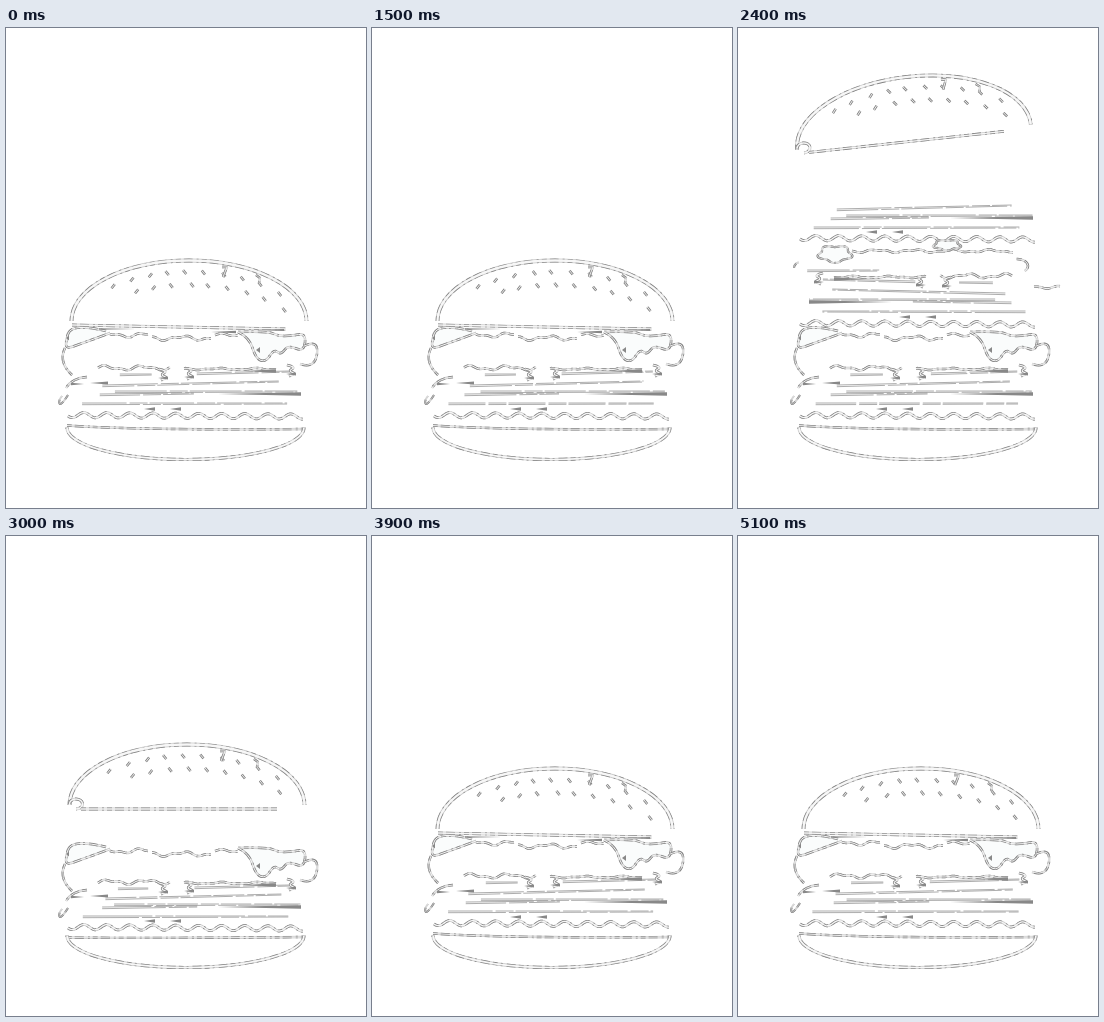
An HTML page with a canvas for the animation above (5.4 s loop, 360x480 px).

```html
<!DOCTYPE html>
<html lang="en">
<head>
<meta charset="utf-8">
<title>Bouncing burger sketch</title>
<style>
html, body { margin: 0; width: 100%; height: 100%; overflow: hidden; background: #fff; }
canvas { display: block; }
</style>
</head>
<body>
<canvas id="stage" width="360" height="480"></canvas>
<script>
const ctx = document.getElementById('stage').getContext('2d');
const LOOP = 5400, BEAT = 300, MID = 183;

// Beats that only prolong the one before
const held = new Set([1, 6, 9, 14]);

// Where the top bun goes; it rests on every other beat
const moves = {
  7: { x: 0, y: -10, turn: 0, squash: 0.2 },
  8: { x: -7, y: -184, turn: -0.108, squash: 0, tall: true },
  10: { x: -2, y: -24, turn: 0, squash: 1 }
};
const rest = { x: 0, y: 0, turn: 0, squash: 0 };

let state = 1;
const seedWith = n => { state = (n + 1) * 7919; };
const rnd = () => (state = state * 16807 % 2147483647) / 2147483647;

function at(x, y, part, flip = 1, turn = 0) {
  ctx.save();
  ctx.translate(x, y);
  ctx.rotate(turn);
  ctx.scale(flip, 1);
  part();
  ctx.restore();
}

function stroke(path, color, width, dash = []) {
  ctx.strokeStyle = color;
  ctx.lineWidth = width;
  ctx.setLineDash(dash);
  ctx.stroke(path);
}

// A white stroke with thin, broken grey edges
function ink(path, w = 3) {
  stroke(path, '#c8c8c8', w);
  stroke(path, '#858585', w, [5, 3, 9, 4, 2, 3]);
  stroke(path, '#f7f7f7', w - 1.5);
}

function fill(path, color = '#fafcfc') {
  ctx.fillStyle = color;
  ctx.fill(path);
}

// Smooth path through the midpoints of a few points
function curve(...p) {
  const path = new Path2D();
  path.moveTo(...p[0]);
  for (let i = 1; i < p.length - 1; i++) {
    const [x, y] = p[i], [u, v] = p[i + 1];
    const end = i === p.length - 2 ? [u, v] : [(x + u) / 2, (y + v) / 2];
    path.quadraticCurveTo(x, y, ...end);
  }
  return path;
}

function plot(x1, x2, f) {
  const path = new Path2D();
  for (let x = x1; x <= x2; x++) path.lineTo(x, f(x));
  return path;
}

function arc(x, y, rx, ry, from, to) {
  const path = new Path2D();
  path.ellipse(x, y, rx, ry, 0, from, to);
  return path;
}

const wave = (x1, x2, y) =>
  ink(plot(x1, x2, x => y + (x - x1) / 150 + 2.6 * Math.sin((x - x1) * Math.PI / 11.5 + 0.4)), 2.8);

function squiggle(x1, x2, y, amp = 2.4) {
  const p = rnd();
  ink(plot(x1, x2, x => y + amp * (0.7 * Math.sin(x / 6 + p) + 0.4 * Math.sin(x / 2.7))), 2.5);
}

// Two hairlines that drift apart
function bar(x1, x2, y, tilt = 0) {
  x1 += rnd() * 5;
  x2 -= rnd() * 5;
  for (const gap of [0, 1.7]) {
    const path = new Path2D(`M${x1},${y + gap}L${x2},${y + tilt + gap * 0.6}`);
    stroke(path, '#999', 0.8, [30 + rnd() * 40, 3, 18, 2]);
  }
}

// Shadow, thick at its second end
function wedge(x1, x2, y, h) {
  fill(new Path2D(`M${x1},${y}L${x2},${y - h / 2}v${h}Z`), '#888');
}

function knob(x, y) {
  ink(curve([x - 5, y - 6], [x + 4, y - 4], [x - 4, y], [x + 5, y + 3], [x - 3, y + 5]), 2.6);
  wedge(x - 6, x + 4, y + 3, 3);
}

function blob(x, y, rx, ry) {
  const path = new Path2D();
  for (let a = 0; a < 6.3; a += 0.1) {
    const r = 1 + 0.13 * Math.sin(a * 5);
    path.lineTo(x + rx * r * Math.cos(a), y + ry * r * Math.sin(a));
  }
  fill(path);
  ink(path, 2.2);
}

// Two rows of seeds that follow the dome
function seeds() {
  for (let i = 0; i < 19; i++) {
    const inner = i % 2;
    const x = (inner ? -64 : -78) + 9.2 * i + rnd() * 3;
    const y = -61 * Math.sqrt(1 - (x / 118) ** 2) + (inner ? 25 : 12);
    const lean = x < -25 ? 1.6 : -1.6;
    ink(new Path2D(`M${x - lean},${y + 2}L${x + lean},${y - 2}`), 2.4);
  }
  ink(new Path2D('M33,-54h5l-4,10'), 2.4);
  ink(new Path2D('M67,-46l4,3l-1,5'), 2.2);
}

function bun({ x, y, turn }) {
  at(MID + x, 293 + y, () => {
    ink(arc(0, 0, 117.5, 60.5, Math.PI, Math.PI * 2), 3.8);
    seeds();
    if (y) {
      ink(arc(-111, -1, 6.5, 5, Math.PI, Math.PI / 2), 3);
      ink(new Path2D('M-106,4L90,4'), 2.8);
    } else {
      ink(new Path2D('M-117,4L97,8'), 2.8);
      wedge(-53, -90, 8, 1.5);
      wedge(22, 47, 11, 2.5);
      wedge(67, 95, 9, 2);
    }
  }, 1, turn);
}

function sauce() {
  const left = curve([100, 303], [84, 299], [64, 300], [60, 312], [60, 321], [74, 316], [88, 311], [104, 305]);
  const right = curve([232, 304], [243, 309], [250, 331], [260, 334], [268, 321], [275, 327],
    [282, 317], [298, 324], [300, 305], [285, 308], [272, 308], [262, 303], [232, 304]);
  for (const path of [left, right]) {
    fill(path);
    ink(path, 2.5);
  }
  wedge(60, 63, 310, 5);
  wedge(250, 254, 322, 6);
  squiggle(104, 142, 307);
  squiggle(146, 205, 310);
  squiggle(209, 232, 307, 1.5);
  ink(curve([59, 320], [52, 334], [66, 347]), 2.4);
  ink(curve([298, 318], [313, 311], [309, 341], [294, 336]), 2.4);
}

// Tomato row with its dripping knobs
function row(y) {
  squiggle(92, 164, y - 2);
  bar(109, 147, y + 4);
  knob(158, y + 5);
  knob(184, y + 4);
  bar(188, 284, y + 3, -2);
  squiggle(178, 270, y - 1, 1);
  wedge(238, 270, y + 1, 3.5);
  knob(286, y + 1);
}

function patty(y) {
  bar(96, 276, y, -4);
  bar(104, 296, y + 6);
  bar(92, 192, y + 9, -1);
  bar(74, 285, y + 18);
  wedge(212, 295, y + 9, 3.5);
}

function lettuce(x, y) {
  wave(62, 297, y);
  for (const shade of [x, x + 26]) wedge(shade, shade + 11, y - 6, 3.5);
}

function leaf() {
  ink(curve([81, 349], [66, 350], [60, 360]), 2.4);
  ink(curve([62, 367], [55, 378], [52, 373], [56, 368]), 2);
  wedge(78, 65, 356, 2.5);
  wedge(84, 102, 355, 3);
}

function base(squash) {
  const y = 399.5;
  ink(curve([61, y - 2 + squash * 4], [135, y + 3], [298, y + 1.5]), 2.4);
  ink(arc(179.5, y, 118.5, 32, 0, Math.PI), 3.2);
}

// Second set of layers, seen only when the burger stands tall
function extraLayers() {
  patty(181);
  lettuce(128, 210);
  squiggle(114, 275, 223, 1.6);
  blob(97, 226, 16, 8);
  blob(209, 217, 13, 5);
  ink(arc(63, 240, 7, 6, Math.PI, Math.PI * 1.4), 2);
  ink(arc(279, 238, 11, 7, -1.6, 0.8), 2.4);
  bar(68, 146, 242);
  at(MID * 2, 0, () => { row(250); patty(265); }, -1);
  squiggle(296, 322, 259, 1.5);
  lettuce(161, 295);
}

function render(beat) {
  const pose = moves[beat] || rest;
  const sink = (depth, part) => at(0, pose.squash * depth, part);
  ctx.fillStyle = '#fff';
  ctx.fillRect(0, 0, 360, 480);
  seedWith(beat % 13);
  base(pose.squash);
  sink(4, () => lettuce(138, 387));
  sink(5, () => { leaf(); patty(357); });
  sink(6, () => row(342));
  sink(8, sauce);
  if (pose.tall) extraLayers();
  bun(pose);
}

ctx.lineJoin = 'round';
const origin = performance.now();

function tick() {
  const t = Math.max(0, performance.now() - origin) % LOOP;
  const beat = Math.floor(t / BEAT);
  render(held.has(beat) ? beat - 1 : beat);
  requestAnimationFrame(tick);
}
tick();
</script>
</body>
</html>
```
